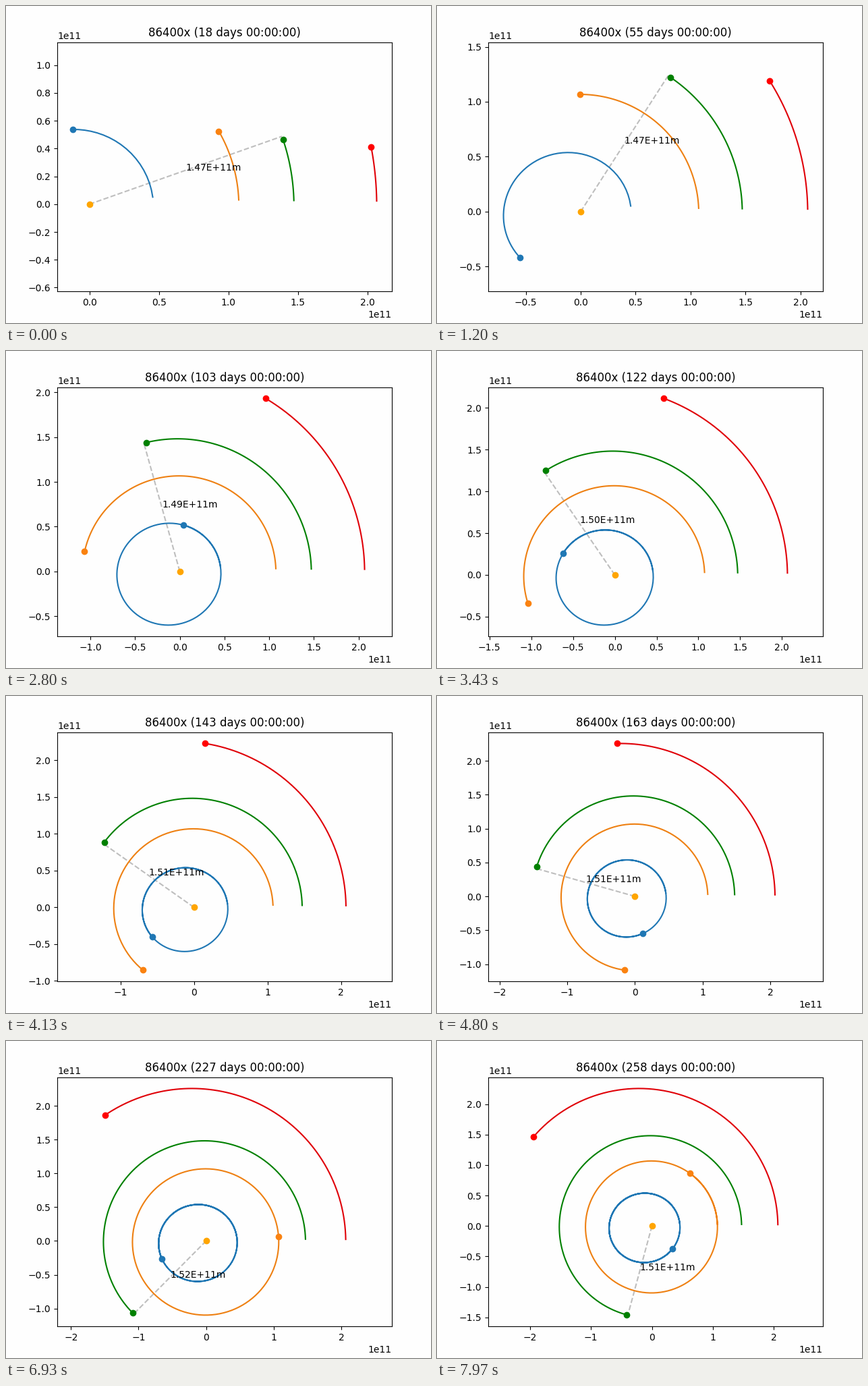
A matplotlib script for the animation above (8 s loop, 630 by 470 pixels).

```python
import numpy as np
import matplotlib.pyplot as plt
from matplotlib.animation import FuncAnimation

GM = 1.32712e20          # gravity of the central star, m^3/s^2
DAY = 86400              # one step, s
LOOP_MS = 8000
TICK_MS = 20             # screen refresh
STEPS_PER_S = 30         # simulation steps shown per second
FIRST_DAY = 18
W, H = 630, 470
BOX_W, BOX_H = 496, 369.6
PAPER = "#fefefe"

# closest distance (m), speed there (m/s), trail colour, dot colour
PLANETS = [
    (46.00e9, 58980, "tab:blue", "tab:blue"),
    (107.48e9, 35260, "#ee8012", "#fa8210"),
    (147.09e9, 30280, "green", "green"),
    (206.62e9, 26500, "#e00008", "red"),
]
EARTH = 2


def orbit(dist, speed, steps):
    """Daily positions by semi-implicit Euler, starting on the x axis."""
    pos, vel = np.array([dist, 0.0]), np.array([0.0, speed])
    path = [pos]
    for _ in range(steps):
        vel = vel - GM * pos / np.hypot(*pos) ** 3 * DAY
        pos = pos + vel * DAY
        path.append(pos)
    return np.array(path)


last_day = FIRST_DAY + LOOP_MS * STEPS_PER_S // 1000 + 1
orbits = [orbit(dist, speed, last_day) for dist, speed, *_ in PLANETS]

fig = plt.figure(figsize=(W / 100, H / 100), dpi=100, facecolor=PAPER)
ax = fig.add_axes([76 / W, 46.8 / H, BOX_W / W, BOX_H / H], facecolor=PAPER)

radius_line, = ax.plot([], [], "--", color="gray", alpha=0.5)
ax.plot([0], [0], "o", color="orange")
trails = [ax.plot([], [], color=c)[0] for _, _, c, _ in PLANETS]
dots = [ax.plot([], [], "o", color=c)[0] for *_, c in PLANETS]
label = ax.text(0, 0, "")
title = ax.set_title("")


def fit_view(points):
    """Equal scale on both axes, with a 5 % margin around the points."""
    low, high = points.min(axis=0), points.max(axis=0)
    mid, span = (low + high) / 2, (high - low) * 1.1
    scale = max(span[0] / BOX_W, span[1] / BOX_H)
    ax.set_xlim(mid[0] - scale * BOX_W / 2, mid[0] + scale * BOX_W / 2)
    ax.set_ylim(mid[1] - scale * BOX_H / 2, mid[1] + scale * BOX_H / 2)


def update(tick):
    # steps start on the nearest 10 ms, so look slightly ahead
    step = (tick * TICK_MS + 15) * STEPS_PER_S // 1000
    # one day is skipped after the opening step
    day = FIRST_DAY + step + (step > 0)
    for path, trail, dot in zip(orbits, trails, dots):
        trail.set_data(path[1:day + 1, 0], path[1:day + 1, 1])
        dot.set_data(path[day:day + 1, 0], path[day:day + 1, 1])

    # the distance line runs one day ahead of the planet
    tip = orbits[EARTH][day + 1]
    radius_line.set_data([0, tip[0]], [0, tip[1]])
    label.set_position(tip / 2)
    label.set_text(f"{np.hypot(*tip):.2E}m")
    title.set_text(f"{DAY}x ({day} days 00:00:00)")

    shown = [path[1:day + 1] for path in orbits]
    fit_view(np.vstack(shown + [[(0, 0), tip]]))
    return [radius_line, label, title, *trails, *dots]


anim = FuncAnimation(fig, update, frames=LOOP_MS // TICK_MS, interval=TICK_MS,
                     init_func=lambda: update(0), repeat=True,
                     repeat_delay=0, blit=False)
plt.show()
```
